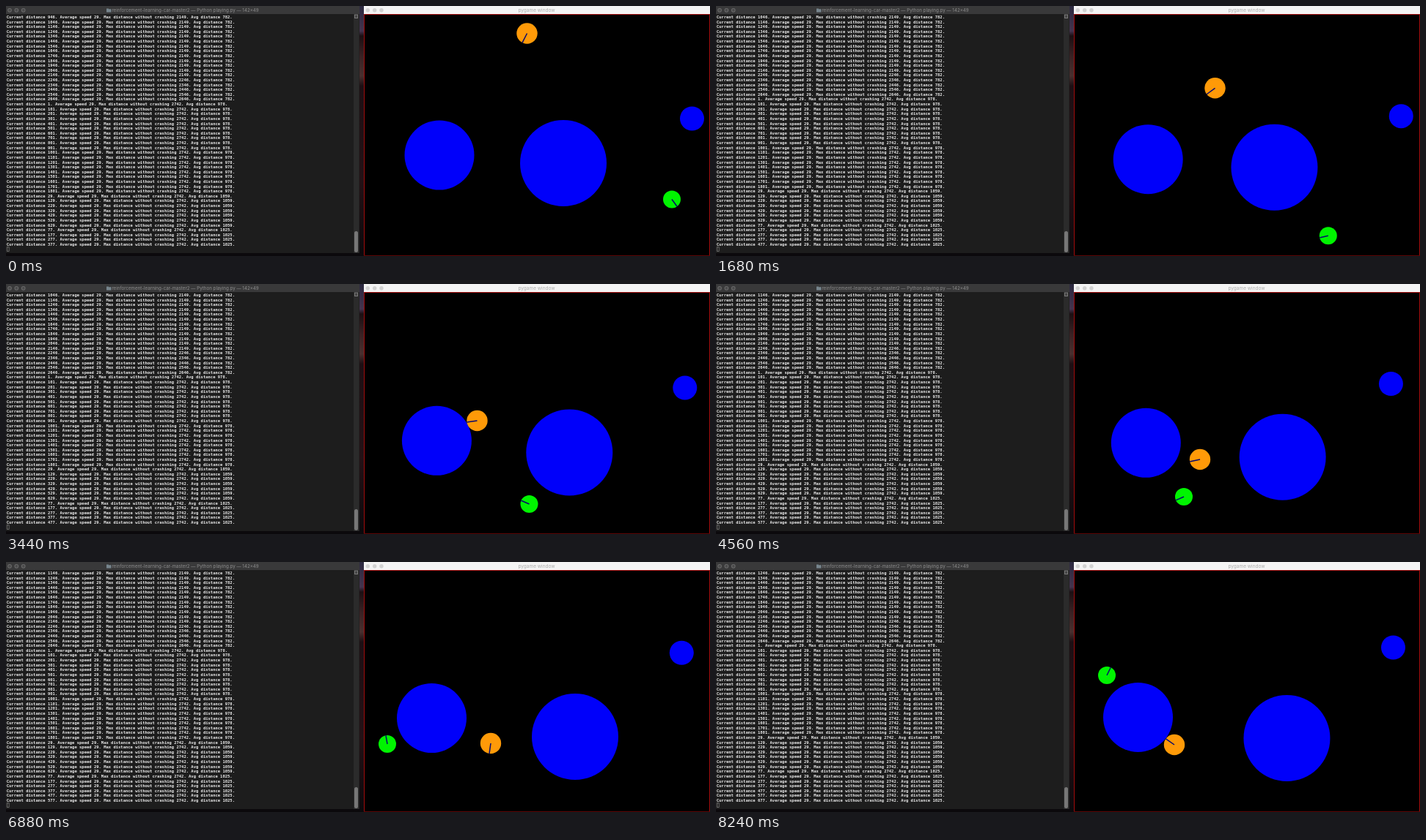
Write an HTML page with a canvas that moves like this. It is 960 px wide and 342 px high and loops after 8320 ms.

```html
<!DOCTYPE html>
<html lang="en">
<head>
<meta charset="utf-8">
<title>pygame window</title>
<style>
  html, body { margin: 0; width: 100%; height: 100%; overflow: hidden; background: #000; }
  canvas { display: block; }
</style>
</head>
<body>
<canvas id="stage" width="960" height="342"></canvas>
<script>
const ctx = document.getElementById('stage').getContext('2d');
const LOOP = 8320, STEP = 80;
const MONO = '"DejaVu Sans Mono", Menlo, monospace';
const UI = 'Inter, Roboto, sans-serif';
const ROWS = 48, PITCH = 6.617;
const PRINTS = [480, 4000, 7520];   // times at which a new log line appears

// Log runs: first distance, last distance, best so far, average
const runs = [
  [946, 2646, 2149, 782],
  [1, 1801, 2742, 978],
  [29, 629, 2742, 1059],
  [77, 677, 2742, 1025]
];
const log = runs.flatMap(([from, to, best, avg]) => {
  const out = [];
  for (let d = from; d <= to; d += 100) {
    out.push(`Current distance ${d}. Average speed 29. Max distance without crashing ${Math.max(d, best)}. Avg distance ${avg}.`);
  }
  return out;
});

// Obstacles drift in straight lines: [time, x, y]
const obstacles = [
  { r: 59, path: [[0, 760, 215], [1100, 759.2, 217.6], [4650, 773, 237.3], [6880, 776, 239], [8320, 778.6, 241.1]] },
  { r: 47.5, path: [[0, 591, 204], [880, 590, 207.5], [4650, 586.2, 217.6], [6880, 580.5, 213.5], [8320, 575.2, 212.4]] },
  { r: 16.5, path: [[0, 935.5, 154], [1150, 936.8, 153.3], [5000, 918.3, 134.3], [8320, 923.6, 116.6]] }
];

// Movers: [time, x, y, heading in degrees]
const car = [
  [0, 908, 264.5, 54], [880, 891.5, 308, 165], [2400, 783.5, 318.5, 169], [3440, 713.5, 301, 203],
  [4560, 638, 291, 156], [6880, 520, 249, 260], [8240, 533, 155, 296]
];
const cat = [
  [0, 710.5, 37.5, 117], [880, 706, 80, 112], [2400, 657, 141, 172], [3440, 642.5, 187, 172],
  [4560, 660, 240, 168], [6880, 661, 248, 98], [8240, 625, 250, 215]
];

const mix = (a, b, u) => a + (b - a) * u;

function span(keys, t) {
  let i = 0;
  while (i < keys.length - 2 && t >= keys[i + 1][0]) i++;
  const dt = keys[i + 1][0] - keys[i][0];
  return { i, dt, u: Math.min(1, (t - keys[i][0]) / dt) };
}

function along(path, t) {
  const { i, u } = span(path, t);
  return [mix(path[i][1], path[i + 1][1], u), mix(path[i][2], path[i + 1][2], u)];
}

function hermite(a, b, va, vb, u) {
  const u2 = u * u, u3 = u2 * u;
  return (2 * u3 - 3 * u2 + 1) * a + (u3 - 2 * u2 + u) * va + (3 * u2 - 2 * u3) * b + (u3 - u2) * vb;
}

// velocity(keys, i) gives px per ms at a key
function pose(keys, t, velocity) {
  const { i, u, dt } = span(keys, t);
  const a = keys[i], b = keys[i + 1];
  const va = velocity(keys, i), vb = velocity(keys, i + 1);
  return {
    x: hermite(a[1], b[1], va[0] * dt, vb[0] * dt, u),
    y: hermite(a[2], b[2], va[1] * dt, vb[1] * dt, u),
    angle: mix(a[3], b[3], u) * Math.PI / 180
  };
}

function driving(keys, i) {
  const a = keys[i][3] * Math.PI / 180;
  return [0.07 * Math.cos(a), 0.07 * Math.sin(a)];
}

function wandering(keys, i) {
  const a = keys[Math.max(0, i - 1)], b = keys[Math.min(keys.length - 1, i + 1)];
  return [1, 2].map(k => (b[k] - a[k]) / (b[0] - a[0]));
}

function rect(x, y, w, h, fill) {
  ctx.fillStyle = fill;
  ctx.fillRect(x, y, w, h);
}

function disc(x, y, r, fill) {
  ctx.fillStyle = fill;
  ctx.beginPath();
  ctx.arc(x, y, r, 0, Math.PI * 2);
  ctx.fill();
}

// Set large and scaled down so that glyph advances stay fractional
function label(text, x, y, size, fill, family, weight = 'normal', align = 'left') {
  ctx.save();
  ctx.translate(x, y);
  ctx.scale(size / 100, size / 100);
  ctx.font = `${weight} 100px ${family}`;
  ctx.textAlign = align;
  ctx.fillStyle = fill;
  ctx.fillText(text, 0, 0);
  ctx.restore();
}

function drawDesktop() {
  const g = ctx.createLinearGradient(0, 0, 0, 342);
  [[0, '#2c2a40'], [0.1, '#44344e'], [0.12, '#1c1013'], [0.2, '#3a2224'], [0.28, '#49302f'],
   [0.32, '#1d1014'], [0.7, '#241216'], [1, '#0b090c']].forEach(([p, c]) => g.addColorStop(p, c));
  rect(0, 0, 488, 342, g);
}

function drawTerminal(t) {
  rect(0, 0, 482, 338, '#1d1d1d');
  rect(0, 0, 482, 11, '#39393a');
  for (const x of [5, 14.3, 23.7]) {
    disc(x, 5.8, 2.8, '#707070');
    disc(x, 5.8, 2, '#4a4a4b');
  }
  rect(137, 3.5, 3, 1.5, '#77858d');
  rect(137, 4.2, 6.5, 4.3, '#77858d');
  label('reinforcement-learning-car-master2 — Python playing.py — 142×49', 244.5, 8, 6.2, '#8e8e8e', UI, 'normal', 'center');

  rect(474, 11, 7.5, 327, '#2b2b2b');
  rect(475, 11.5, 5, 5.5, '#777');
  rect(476, 12.5, 3, 3.5, '#444');
  ctx.fillStyle = '#777';
  ctx.beginPath();
  ctx.roundRect(475, 308, 5, 29, 2.5);
  ctx.fill();

  const first = PRINTS.filter(p => t >= p).length;
  for (let i = 0; i < ROWS; i++) {
    label(log[first + i], 0.7, 17 + i * PITCH, 5.5, '#ececec', MONO, 'bold');
  }
  ctx.strokeStyle = '#8a8a8a';
  ctx.lineWidth = 0.7;
  ctx.strokeRect(1.3, 329.8, 2.8, 5.6);
}

function drawMover({ x, y, angle }, r, fill) {
  disc(x, y, r, fill);
  ctx.strokeStyle = '#08086e';
  ctx.lineWidth = 1.5;
  ctx.beginPath();
  ctx.moveTo(x, y);
  ctx.lineTo(x + r * Math.cos(angle), y + r * Math.sin(angle));
  ctx.stroke();
}

function drawGame(t) {
  rect(488, 0, 472, 342, '#000');
  rect(488, 0, 472, 11, '#f4f4f4');
  for (const x of [493.3, 502.7, 512]) disc(x, 5.8, 2.7, '#d2d2d2');
  label('pygame window', 723.5, 8, 6.5, '#acacac', UI, 'normal', 'center');

  rect(488, 11, 472, 1, '#a00c0c');
  rect(488, 11, 1, 331, '#a00c0c');
  rect(959, 11, 1, 331, '#a00c0c');
  rect(488, 341, 472, 1, '#5c0606');

  for (const { r, path } of obstacles) {
    const [x, y] = along(path, t);
    disc(x, y, r, '#0000fa');
  }
  drawMover(pose(cat, t, wandering), 14.2, '#ff9a08');
  drawMover(pose(car, t, driving), 12, '#00f400');
}

let shown = -1;
function frame() {
  const t = Math.floor(performance.now() % LOOP / STEP) * STEP;
  if (t !== shown) {
    shown = t;
    drawDesktop();
    drawTerminal(t);
    drawGame(t);
  }
  requestAnimationFrame(frame);
}
frame();
</script>
</body>
</html>
```
